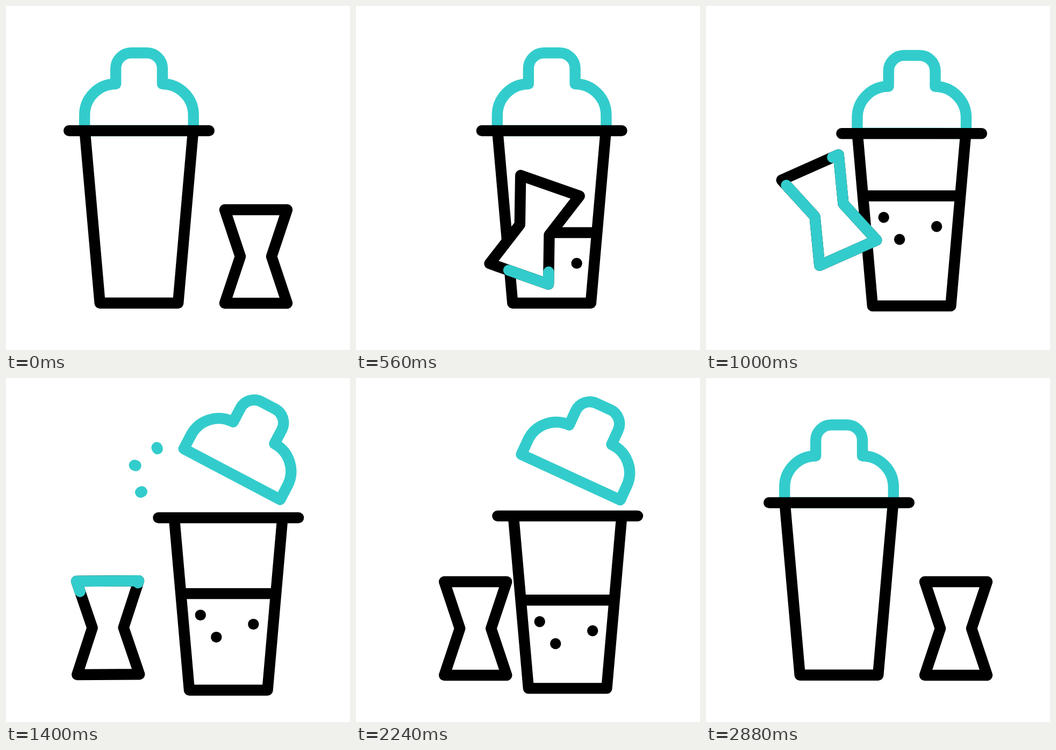
These frames come from a looping animation (640x640 px, 3000 ms). An HTML page:

```html
<!DOCTYPE html>
<html lang="en">
<head>
<meta charset="utf-8">
<title>Shaker and jigger</title>
<style>
  html, body { margin: 0; width: 100%; height: 100%; overflow: hidden; background: #fff; }
  svg { display: block; width: 100vw; height: 100vh; }
  .line { fill: none; stroke: #000; stroke-width: 20.4; stroke-linecap: round; stroke-linejoin: round; }
  .teal { stroke: #3cc; }
  .solid { fill: #fff; }
</style>
</head>
<body>
<svg viewBox="0 0 640 640">
  <defs>
    <clipPath id="inside"><path d="M146.6 232L174.7 552.8H320.2L348.2 232Z"/></clipPath>
    <path id="outline" d="M-58 -87H58L29 0L58 87H-58L-29 0Z"/>
  </defs>
  <g id="sparks"></g>
  <g id="cup">
    <path id="lid" class="line teal" d="M146.2 232V203A58 58 0 0 1 204.2 145V116A29 29 0 0 1 233.2 87.2H262A29 29 0 0 1 291 116V145A58 58 0 0 1 348.8 203V232Z"/>
    <g clip-path="url(#inside)">
      <g id="liquid">
        <path class="line" d="M100 0H400"/>
        <circle cx="195.5" cy="40" r="10.2"/>
        <circle cx="225" cy="81" r="10.2"/>
        <circle cx="294" cy="57" r="10.2"/>
      </g>
    </g>
    <path class="line" d="M146.6 232L174.7 552.8H320.2L348.2 232M117.2 232H377.8"/>
  </g>
  <g id="jigger">
    <use href="#outline" class="line solid"/>
    <use href="#outline" class="line teal" id="glow"/>
  </g>
</svg>
<script>
const LOOP = 3000;
const OUTLINE = 232 + 4 * Math.hypot(29, 87); // length around the jigger
const $ = id => document.getElementById(id);

// 0 before a, 1 after b, smooth in between
const ease = (t, a, b) => {
  const x = Math.min(1, Math.max(0, (t - a) / (b - a)));
  return x * x * (3 - 2 * x);
};

const move = (id, x, y, more = "") => $(id).setAttribute("transform", `translate(${x} ${y}) ${more}`);

// Three rays fanning out to the left
const sparks = [[157, 60], [200.5, 71], [245, 62]].map(([degrees, start]) => {
  const el = document.createElementNS("http://www.w3.org/2000/svg", "path");
  el.setAttribute("class", "line teal");
  $("sparks").append(el);
  const angle = degrees * Math.PI / 180;
  const at = r => `${308 + Math.cos(angle) * (start + r)} ${188 + Math.sin(angle) * (start + r)}`;
  return { el, at };
});

function drawCup(t, away) {
  const lift = ease(t, 895, 1280);
  move("cup", (128 * ease(t, 120, 660) + 38.3 * lift) * away, 28 * lift * away);

  const open = ease(t, 980, 1430) * (1 - ease(t, 2127, 2650));
  move("lid", 6.7 * open, -82 * open, `rotate(${28.1 * open} 247.5 232)`);

  const level = 553 - 207.5 * ease(t, 120, 868) + 28 * ease(t, 900, 1440) + 179.5 * ease(t, 2146, 2677);
  move("liquid", 0, level);
}

function drawJigger(t, away) {
  const settle = ease(t, 900, 1440);
  const x = 465 - (232 * ease(t, 120, 924) + 44 * settle) * away;
  const y = 466 + 95 * (settle - ease(t, 120, 976));
  move("jigger", x, y, `rotate(${333.6 * ease(t, 120, 900) + 26.4 * settle})`);
}

// A band that runs round the jigger, growing and then shrinking
function drawGlow(t) {
  const d = t - 1000, on = Math.abs(d) < 630;
  const len = 482 * Math.cos(Math.PI / 2 * d / 630) ** 2;
  const mid = 344 + d * (.741 + d * 4.7e-5);
  const { style } = $("glow");
  style.display = on ? "" : "none";
  style.strokeDasharray = `${len} ${OUTLINE - len}`;
  style.strokeDashoffset = len / 2 - mid;
}

function drawSparks(t) {
  const tail = 38 * ease(t, 1640, 1960), head = 38 * ease(t, 1350, 1660);
  for (const { el, at } of sparks) {
    el.style.display = head > tail ? "" : "none";
    el.setAttribute("d", `M${at(tail)}L${at(head)}`);
  }
}

function tick() {
  const t = performance.now() % LOOP;
  const away = 1 - ease(t, 2120, 2678);
  drawCup(t, away);
  drawJigger(t, away);
  drawGlow(t);
  drawSparks(t);
  requestAnimationFrame(tick);
}
tick();
</script>
</body>
</html>
```
